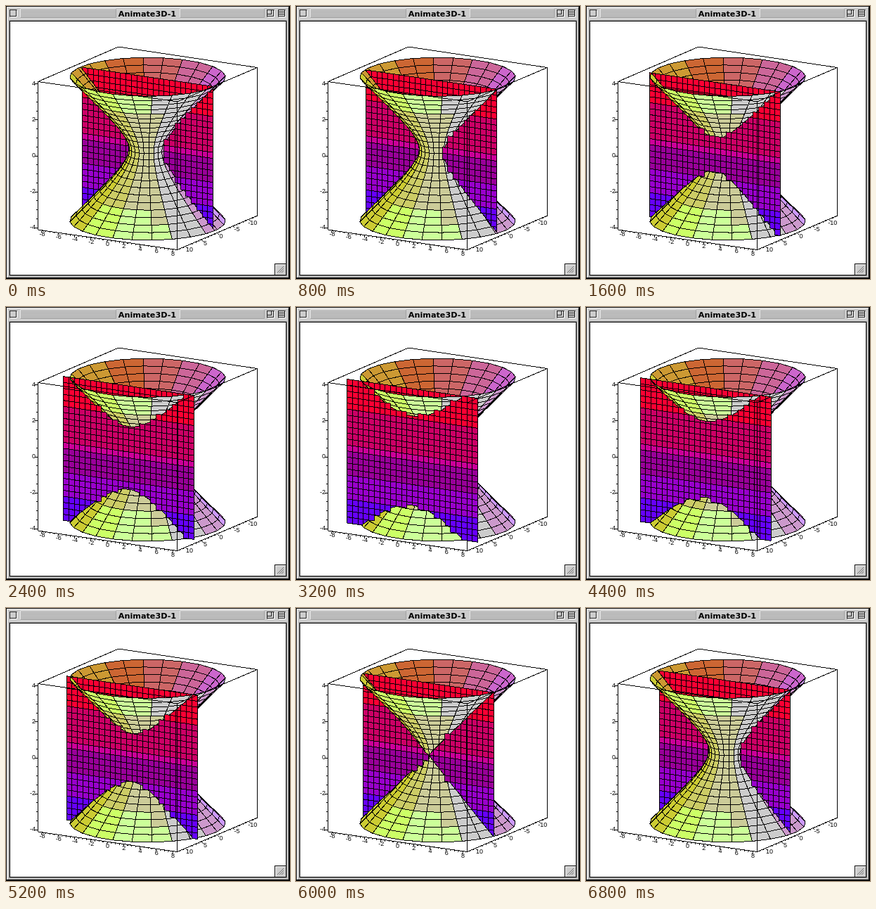
These frames come from a looping animation (404 px wide and 388 px high, 7.2 s). An HTML page:

```html
<!DOCTYPE html>
<html lang="en">
<head>
<meta charset="utf-8">
<title>Animate3D-1</title>
<style>
  html, body { margin: 0; width: 100%; height: 100%; overflow: hidden; background: #fff; }
  svg { display: block; }
  .crisp { shape-rendering: crispEdges; }
  .title { font: bold 11.2px "DejaVu Sans", Verdana, sans-serif; }
  .label { font: 9px "Liberation Sans", Arial, sans-serif; }
</style>
</head>
<body>
<svg width="404" height="388" viewBox="0 0 404 388">
  <g id="chrome" class="crisp"></g>
  <g id="axes" class="crisp" stroke="#000" fill="none"></g>
  <g id="labels" class="label"></g>
  <g id="scene" class="crisp" stroke="#000" stroke-width="1" stroke-linejoin="bevel"></g>
  <path class="crisp" stroke="#000" fill="none"
    d="M45.5 107.5L243.5 136L357.5 87.5M243.5 136V346"/>
  <text class="title" x="201" y="14.5" text-anchor="middle">Animate3D-1</text>
</svg>
<script>
const STEP = 400, TURN = 9, GRID = 24;
const RAD = Math.PI / 180;
const SKEW = -3.4;

const el = id => document.getElementById(id);
const rect = (x, y, w, h, fill) =>
  `<rect x="${x}" y="${y}" width="${w}" height="${h}" fill="${fill}"/>`;
const line = (x1, y1, x2, y2) => `<path d="M${x1} ${y1}L${x2} ${y2}"/>`;

// ---------- window ----------
function button(x, y, inner = '') {
  return rect(x, y, 11, 11, '#777') + rect(x + 1, y + 1, 10, 10, '#fff') +
    rect(x, y, 10, 10, '#222') + rect(x + 1, y + 1, 8, 8, '#ccc') + inner;
}

function drawChrome() {
  let s = rect(0, 0, 404, 388, '#000') + rect(1, 1, 401, 385, '#fff') +
    rect(2, 2, 400, 384, '#999') + rect(2, 2, 399, 383, '#ccc');
  for (const [x, w] of [[20, 136], [247, 120]])
    for (let y = 4; y < 16; y += 2)
      s += rect(x, y, w, 1, '#fff') + rect(x + 1, y + 1, w, 1, '#777');
  s += button(5, 5);
  s += button(371, 5, rect(372, 11, 6, 1, '#222') + rect(377, 6, 1, 6, '#222'));
  s += button(387, 5, rect(388, 8, 8, 1, '#222') + rect(388, 11, 8, 1, '#222'));
  s += rect(4, 20, 396, 364, '#999') + rect(5, 21, 394, 362, '#000') +
    rect(6, 22, 392, 360, '#fff');
  s += rect(382, 366, 16, 16, '#000') + rect(383, 367, 15, 15, '#fff') +
    rect(384, 368, 14, 14, '#ccc');
  s += '<g stroke="#777">';
  for (const d of [0, 3, 6]) s += line(386 + d, 379, 395, 370 + d);
  el('chrome').innerHTML = s + '</g>';
}

// ---------- projection ----------
const project = ([x, y, z]) => [
  201.5 + 11.63 * x - 4.487 * y,
  203 + 1.705 * x + 1.92 * y - 25.56 * z
];

function poly(points, fill) {
  const p = points.map(v => project(v).map(n => n.toFixed(1)).join()).join(' ');
  return `<polygon points="${p}" fill="${fill}"/>`;
}

// ---------- axes ----------
function drawAxes() {
  let s = '<path d="M45.5 107.5L160 58L357.5 87.5V298L243.5 346.5L45.5 318Z"/>';
  let t = '';
  const label = (x, y, n, anchor) =>
    t += `<text x="${x}" y="${y}" text-anchor="${anchor}">${n}</text>`;
  for (let i = -8; i <= 8; i++) {
    const y = 213 - i * 12.78, major = i % 4 === 0;
    s += line(46, y, major ? 41 : 43, y);
    if (major) label(42, y + 2, i / 2, 'end');
  }
  for (let i = -16; i <= 16; i++) {
    const x = 144.5 + i * 5.815, y = 332 + i * .85, major = i % 4 === 0;
    s += line(x, y, x - 1, y + (major ? 4 : 2));
    if (major) label(x, y + 9, i / 2, 'middle');
  }
  for (let i = -12; i <= 12; i++) {
    const x = 300 - i * 4.487, y = 322 + i * 1.92, major = i % 5 === 0;
    s += line(x, y, x + (major ? 3 : 2), y + (major ? 3 : 1));
    if (major) label(x + 6, y + 8, i, 'middle');
  }
  el('axes').innerHTML = s;
  el('labels').innerHTML = t;
}

// ---------- hyperboloid x²/4 + y²/9 - z² = 1 ----------
// One colour per column, starting at the front and going round to the left.
const COLUMNS = ('cc9 cc9 cc6 cc6 cc3 cc3 cc3 c93 c93 c93 c63 c63 ' +
  'c66 c66 c69 c69 c6c c6c c9f c9c c9c ccc ccc cc9').split(' ');

function cellColour(col, z) {
  const rim = Math.abs(z) > 2.7;
  if (rim && col < 2) return '#cf9';
  if (rim && col < 4) return '#cf6';
  if (col === 23 && z > 2.7) return '#ccc';
  if (col === 23 && z < -3.3) return '#cf9';
  return '#' + COLUMNS[col];
}

function surfacePoint(angle, z) {
  const r = Math.hypot(1, z), a = (angle + 60) * RAD;
  return [2 * r * Math.cos(a), 3 * r * Math.sin(a), z];
}

function makeCells() {
  const cells = [], dz = 8 / GRID, da = 360 / GRID;
  for (let col = 0; col < GRID; col++) {
    const a = SKEW + col * da;
    for (let row = 0; row < GRID; row++) {
      const z = -4 + row * dz, mid = z + dz / 2;
      cells.push({
        points: [surfacePoint(a, z), surfacePoint(a + da, z),
          surfacePoint(a + da, z + dz), surfacePoint(a, z + dz)],
        fill: cellColour(col, mid),
        depth: 26.1 * Math.hypot(1, mid) * Math.cos((a + da / 2) * RAD) + 6.5 * mid
      });
    }
  }
  return cells.sort((p, q) => p.depth - q.depth);
}

// Keeps the part of a polygon in front of (side 1) or behind (side -1) y = k.
function clip(points, k, side) {
  const out = [];
  points.forEach((p, i) => {
    const q = points[(i + 1) % points.length];
    const dp = (p[1] - k) * side, dq = (q[1] - k) * side;
    if (dp >= 0) out.push(p);
    if (dp * dq < 0) {
      const f = dp / (dp - dq);
      out.push(p.map((v, j) => v + (q[j] - v) * f));
    }
  });
  return out;
}

// ---------- moving plane ----------
const outside = (x, k, z) => x * x / 4 + k * k / 9 - z * z > 1;

function bandColour(row) {
  if (row < 5) return '#ff0033';
  if (row < 11) return '#cc0066';
  if (row < 12) return '#cc0099';
  if (row < 16) return '#990099';
  if (row < 20) return '#9900cc';
  return '#6600ff';
}

function planeCells(k) {
  const all = [], teeth = [];
  const w = 16 / GRID, h = 8 / GRID;
  for (let row = 0; row < GRID; row++) {
    for (let col = 0; col < GRID; col++) {
      const x = -8 + col * w, z = 4 - row * h;
      const corners = [[x, k, z], [x + w, k, z], [x + w, k, z - h], [x, k, z - h]];
      const cell = poly(corners, bandColour(row));
      all.push(cell);
      // Whole cells overlap the cut edge where it faces the viewer.
      const cx = x + w / 2, cz = z - h / 2;
      const facing = Math.cos(Math.atan2(k / 3, cx / 2) - 60 * RAD) > .25;
      if (facing && outside(cx, k, cz) && corners.some(c => !outside(...c)))
        teeth.push(cell);
    }
  }
  return { all: all.join(''), teeth: teeth.join('') };
}

const cells = makeCells();

function surface(k, side) {
  return cells.map(c => {
    const p = clip(c.points, k, side);
    return p.length > 2 ? poly(p, c.fill) : '';
  }).join('');
}

function drawScene(k) {
  const plane = planeCells(k);
  el('scene').innerHTML = surface(k, -1) + plane.all + surface(k, 1) + plane.teeth;
}

let shown = -1;
const start = performance.now();
function tick() {
  const n = Math.floor((performance.now() - start) / STEP) % (2 * TURN);
  const k = n <= TURN ? n : 2 * TURN - n;
  if (k !== shown) drawScene(shown = k);
  requestAnimationFrame(tick);
}

drawChrome();
drawAxes();
tick();
</script>
</body>
</html>
```
